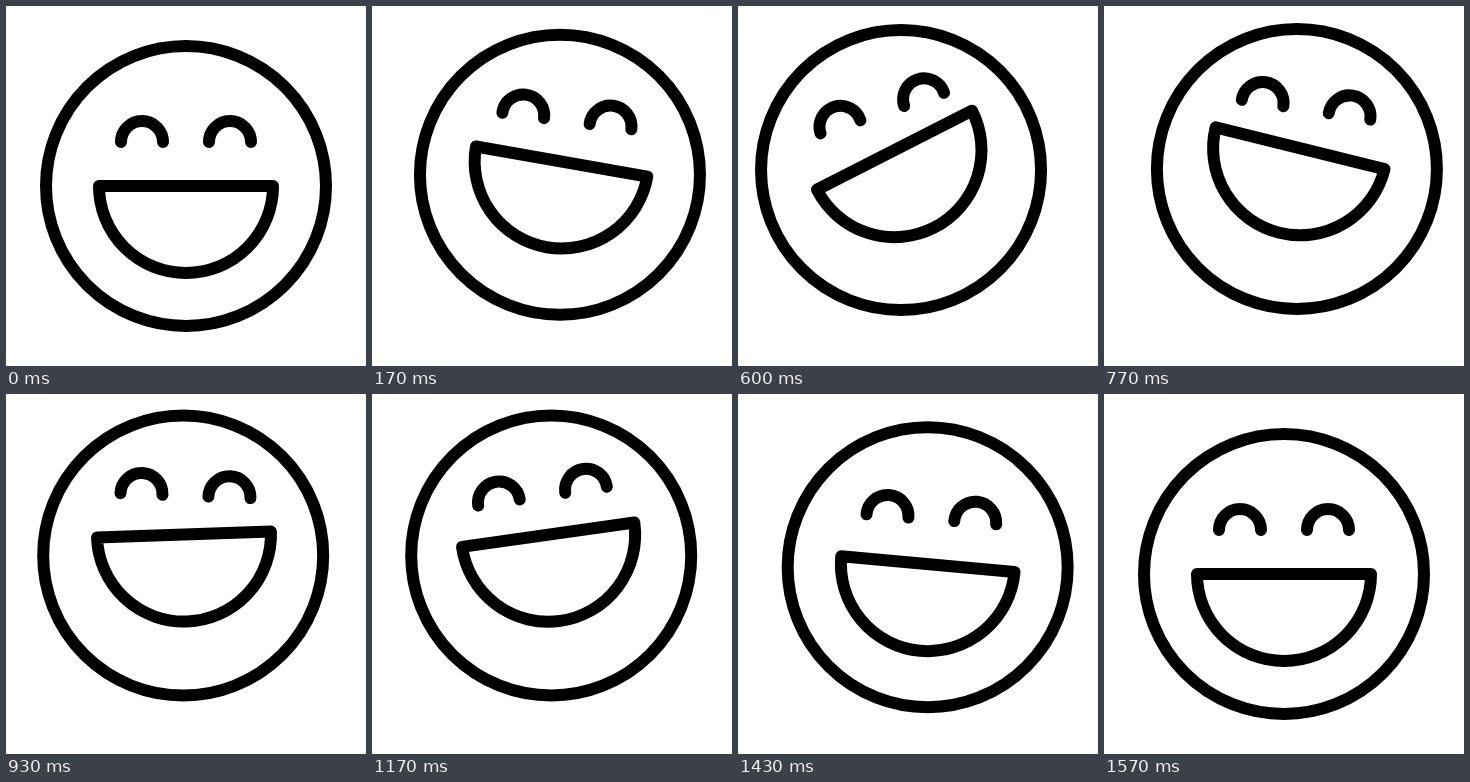
Write an HTML page that moves like this. It is 360 px wide and 360 px high and loops after 2000 ms.

```html
<!DOCTYPE html>
<html lang="en">
<head>
<meta charset="utf-8">
<title>Laughing face</title>
<style>
  html, body { margin: 0; height: 100%; overflow: hidden; background: #fff; }
  svg { display: block; width: 100%; height: 100%; }
</style>
</head>
<body>
<svg viewBox="0 0 360 360" fill="none" stroke="#000" stroke-width="12" stroke-linecap="round" stroke-linejoin="round">
  <g id="head">
    <circle r="140"/>
    <g id="face">
      <path id="eyes" d="M-65-44a21 21 0 0 1 42 0M23-44a21 21 0 0 1 42 0"/>
      <path id="mouth" d="M-87 0H87A87 87 0 0 1-87 0Z"/>
    </g>
  </g>
</svg>
<script>
const LOOP = 2000, FPS = 30;
const [head, face, eyes, mouth] = ['head', 'face', 'eyes', 'mouth'].map(id => document.getElementById(id));

// Keys are [frame, value] pairs, joined by sine easing.
const sway = [[0, 0], [8.5, 12.5], [17, -18.5], [24.3, 15.5], [31, -16], [39.5, 17.5], [47, 0]];
const tilt = [[0, 0], [10, 14.6], [18, -18.2], [25, 15], [32, -18], [39.5, 10], [46, 0]];
const mouthTilt = [[0, 0], [9, 4.5], [17.5, -9], [24, 6], [30.5, -9], [39, 8], [44, 0]];
const raise = (height, start, end) => [[0, 0], [8.5, -height], [start, -height], [end, 0]];
const headRaise = raise(18.5, 38, 47);
const eyesRaise = raise(16, 37, 46);
const mouthRaise = raise(21, 37, 45);

function valueAt(keys, frame) {
  const next = keys.findIndex(key => key[0] > frame);
  if (next < 0) return keys[keys.length - 1][1];
  const [t0, a] = keys[next - 1], [t1, b] = keys[next];
  return a + (b - a) * (1 - Math.cos(Math.PI * (frame - t0) / (t1 - t0))) / 2;
}

function place(part, x, y, angle = 0) {
  part.setAttribute('transform', `translate(${x} ${y}) rotate(${angle})`);
}

function draw() {
  const time = performance.now() % LOOP;
  const frame = Math.floor((time + 3.4) * FPS / 1000) % (LOOP * FPS / 1000);
  const at = keys => valueAt(keys, frame);
  const x = at(sway);
  // The head dips slightly at the ends of each swing.
  place(head, 180 + x, 180 + at(headRaise) + x * x / 110);
  place(face, 0, 0, at(tilt));
  place(eyes, 0, at(eyesRaise));
  place(mouth, 0, at(mouthRaise), at(mouthTilt));
  requestAnimationFrame(draw);
}
draw();
</script>
</body>
</html>
```
